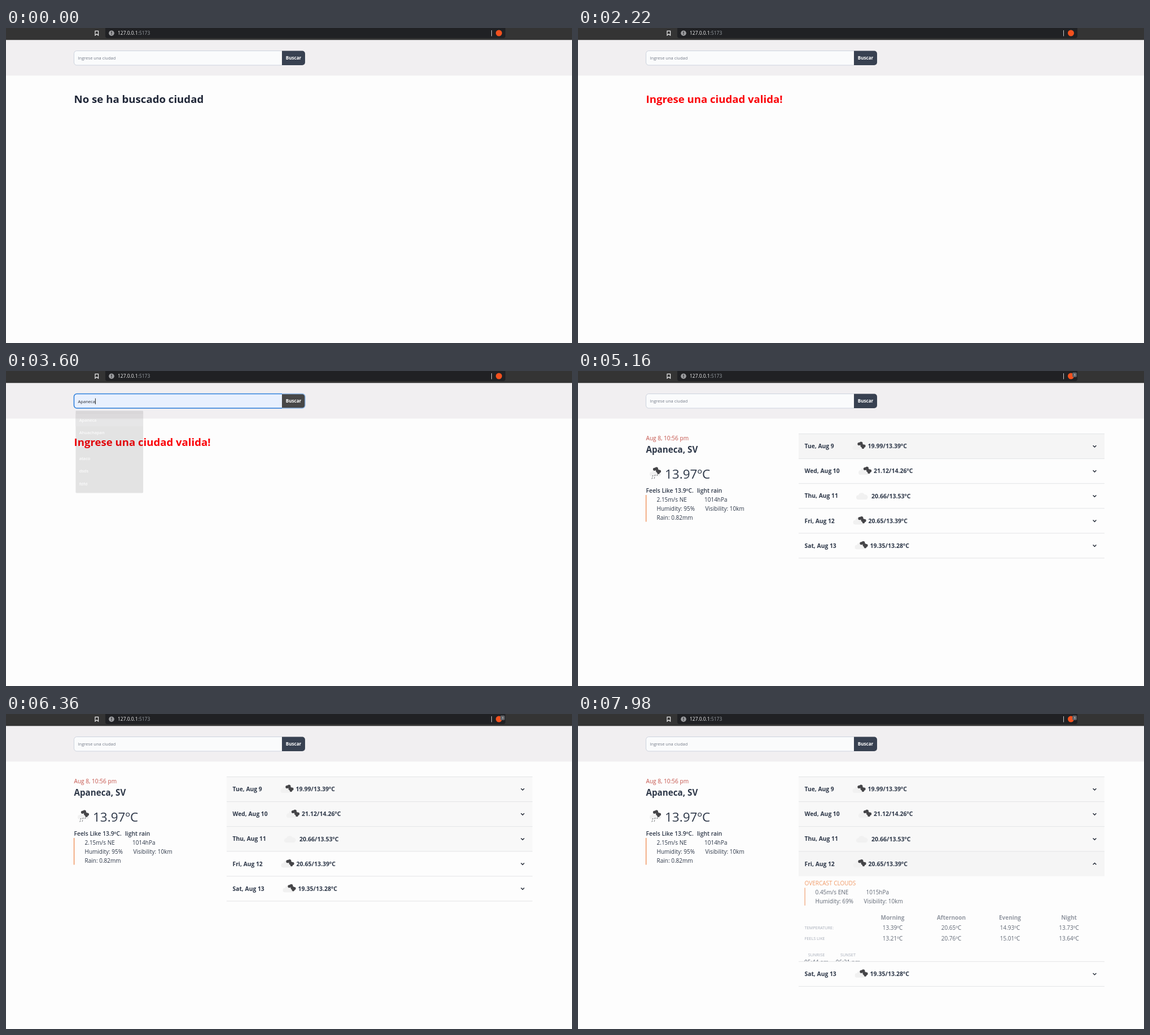
An HTML page that plays this animation: 1003 by 559 pixels, repeating every 8 s.

```html
<!DOCTYPE html>
<html lang="es">
<head>
<meta charset="utf-8">
<title>Clima</title>
<style>
  html, body { margin: 0; width: 100%; height: 100%; overflow: hidden; background: #fdfdfd; }
  svg { display: block; }
  text { font-family: "Open Sans", "Noto Sans", sans-serif; white-space: pre; }
</style>
</head>
<body>
<svg id="stage" width="1003" height="559" viewBox="0 0 1003 559"></svg>
<script>
const stage = document.getElementById('stage');
const LOOP = 8000, STEP = 60;
const INK = '#2d3748', ORANGE = '#ed8243';
const PANEL = 171, ROW = 44.1, TOP = 111.5;
const pen = document.createElement('canvas').getContext('2d');

const clamp = v => Math.max(0, Math.min(1, v));

// CSS "ease": cubic-bezier(.25, .1, .25, 1)
function ease(x) {
  x = clamp(x);
  const bez = (u, a, b) => 3 * u * (1 - u) * (1 - u) * a + 3 * u * u * (1 - u) * b + u * u * u;
  let lo = 0, hi = 1;
  for (let i = 0; i < 24; i++) {
    const mid = (lo + hi) / 2;
    if (bez(mid, .25, .25) < x) lo = mid; else hi = mid;
  }
  return bez(lo, .1, 1);
}

const ramp = (t, a, b) => clamp((t - a + STEP) / (b - a + STEP));
const pulse = (t, a, b, c, d) => ramp(t, a, b) - ramp(t, c, d);

// y is the middle of the capital letters
function text(x, y, size, str, fill = INK, weight = 400, anchor = 'start') {
  return `<text x="${x}" y="${y + size * .357}" font-size="${size}" fill="${fill}" font-weight="${weight}" text-anchor="${anchor}">${str}</text>`;
}
const rect = (x, y, w, h, fill, r = 0) =>
  `<rect x="${x}" y="${y}" width="${w}" height="${h}" rx="${r}" fill="${fill}"/>`;
const circle = (x, y, r, fill) => `<circle cx="${x}" cy="${y}" r="${r}" fill="${fill}"/>`;
const path = (d, stroke, width, extra = '') =>
  `<path d="${d}" fill="none" stroke="${stroke}" stroke-width="${width}" ${extra}/>`;

function lightCloud(x, y) {
  return `<path transform="translate(${x} ${y})" d="M4 12a4 4 0 0 1 0-8a6 6 0 0 1 11-1a4.5 4.5 0 0 1 2 9z" fill="#f1f1f1"/>`;
}
function darkCloud(x, y) {
  return [[-15.5, -4.2, 2.6], [-12, -5, 3], [-10, -1.2, 3], [-6.5, -.5, 2.6], [-8.5, 2.2, 2.4]]
    .map(([dx, dy, r]) => circle(x + dx, y + dy, r, '#454548')).join('');
}

// Browser bar

function browser(t) {
  let s = rect(0, 0, 1003, 21.5, '#343434') + rect(176, -6, 709, 24, '#202124', 4);
  s += path('M158 5.3h5.6v7.6l-2.8-2.2l-2.8 2.2z', '#f0f0f0', 1.2);
  s += circle(187, 9.2, 4.8, '#9c9da0') + rect(186.4, 6.2, 1.2, 3.6, '#202124') + rect(186.4, 10.7, 1.2, 1.3, '#202124');
  s += text(198, 9.3, 8.45, '127.0.0.1<tspan fill="#9aa0a6">:5173</tspan>', '#f2f2f2');
  s += rect(860, 4, 1, 10.5, '#c8c8c8') + circle(873.5, 9, 5.5, '#f4511e');
  if (t >= 4440) s += rect(876, 2.5, 8, 8.5, '#5b5e63', 2) + text(880, 6.8, 6, '3', '#eee', 400, 'middle');
  return s;
}

// Search form

function typed(t) {
  if (t >= 3120 && t < 4200) return 'Apaneca';
  if (t >= 2100) return '';
  return 'fdfd'.slice(0, [780, 840, 1020, 1080].filter(k => t >= k).length);
}

function caretOn(t) {
  return (t >= 480 && t < 1620) || (t >= 2700 && t < 3120) || (t >= 3480 && t < 3960);
}

function form(t) {
  const word = typed(t);
  const ring = pulse(t, 480, 600, 1800, 1920) + pulse(t, 2700, 2820, 4200, 4320);
  const press = pulse(t, 1800, 1920, 2100, 2220) + pulse(t, 4200, 4320, 4440, 4560);
  const fill = word === 'Apaneca' ? '#e8f0fe' : ring > .5 ? '#fefefe' : '#fafbfc';
  const box = 'M489 40.5H125.5a5 5 0 0 0-5 5V61a5 5 0 0 0 5 5H489';
  const button = 'M489 40.5H525a5 5 0 0 1 5 5V61a5 5 0 0 1-5 5H489';
  let s = rect(0, 21.5, 1003, 63, '#f1eff1');
  s += `<path d="${box}z" fill="${fill}"/>` + path(box, '#cdd3de', 1);
  s += `<path d="${button}z" fill="${ring > .5 ? '#474747' : '#384151'}"/>`;
  s += path(box, '#2f80dc', 1.6, `opacity="${ring}"`) + path(button, '#8fb8e8', 1.4, `opacity="${ring}"`);
  s += path('M489 39H525a6.500 6.500 0 0 1 6.500 6.500V61a6.500 6.500 0 0 1-6.500 6.500H489z', '#a9c8ee', 2.4, `opacity="${press}"`);
  s += word ? text(127.5, 53.8, 7.6, word, '#24272e') : text(127.5, 53.8, 7.55, 'Ingrese una ciudad', '#757c89');
  s += text(509.500, 53.3, 8.1, 'Buscar', '#fff', 700, 'middle');
  if (caretOn(t)) {
    pen.font = '7.6px "Open Sans", "Noto Sans", sans-serif';
    s += rect(127.5 + pen.measureText(word).width, 48.5, .9, 10.5, '#111');
  }
  return s;
}

function suggestions(t) {
  const first = t < 2100;
  const a = first ? pulse(t, 480, 600, 1140, 1260) : pulse(t, 2700, 2820, 3480, 3660);
  if (a <= 0) return '';
  const items = first && t >= 780 ? ['fdfd'] : ['Apaneca', 'Ahuachapan', 'atac', 'ataco', 'dsds', 'fdfd'];
  const h = 34 + (items.length - 1) * 23.8, cy = 67 + h / 2, k = 1 - .062 * (1 - a);
  let s = rect(120.5, 67, 125.500, h, '#37373a', 1.5);
  if (t >= 3120 && !first) s += rect(120.5, 73, 125.5, 23, '#505054');
  s += items.map((w, i) => text(127, 84.3 + i * 23.8, 7.8, w, '#f4f4f4', 600)).join('');
  return `<g opacity="${a ** 1.5}" transform="translate(183.5 ${cy}) scale(${k}) translate(-183.5 ${-cy})">${s}</g>`;
}

// Weather

const days = [
  { date: 'Tue, Aug 9', x: 513.5, temp: '19.99/13.39', sky: 'LIGHT RAIN', wind: '0.92m/s NE', hpa: 1014, hum: 77,
    temps: [13.39, 19.99, 15.42, 14.31], feels: [13.26, 20.19, 15.36, 14.24] },
  { date: 'Wed, Aug 10', x: 524, temp: '21.12/14.26' },
  { date: 'Thu, Aug 11', x: 520, temp: '20.66/13.53', plain: true, sky: 'SCATTERED CLOUDS', wind: '0.71m/s NE', hpa: 1015, hum: 71,
    temps: [13.53, 20.66, 15.12, 14.05], feels: [13.38, 20.71, 15.08, 13.97] },
  { date: 'Fri, Aug 12', x: 514.5, temp: '20.65/13.39', sky: 'OVERCAST CLOUDS', wind: '0.45m/s ENE', hpa: 1015, hum: 69,
    temps: [13.39, 20.65, 14.93, 13.73], feels: [13.21, 20.76, 15.01, 13.64] },
  { date: 'Sat, Aug 13', x: 517.5, temp: '19.35/13.28' }
];
const toggles = { 0: [5280, 6120], 2: [6720, 7320], 3: [7800, 9999] };

function current() {
  let s = text(120.5, 119.5, 10.1, 'Aug 8, 10:56 pm', '#c4524a');
  s += text(120.5, 140, 15.2, 'Apaneca, SV', INK, 700);
  s += lightCloud(127, 175) + darkCloud(151, 178.500);
  s += [[133, 185], [137, 184], [141, 183.500], [132, 189], [136, 188.500]]
    .map(([x, y]) => path(`M${x} ${y}l-1.200 2.400`, '#55585c', 1)).join('');
  s += text(154, 183, 22.5, '13.97ºC');
  s += text(120.5, 212.7, 10.3, 'Feels Like 13.9ºC.', INK, 600) + text(211, 212.7, 10.3, 'light rain', INK, 600);
  s += rect(120, 220, 1.2, 47.5, ORANGE);
  s += text(139.5, 228.700, 10, '2.15m/s NE') + text(224, 228.700, 10, '1014hPa');
  s += text(139.5, 244.4, 10, 'Humidity: 95%') + text(225.5, 244.4, 10, 'Visibility: 10km');
  return s + text(139.5, 260.2, 10, 'Rain: 0.82mm');
}

function panel(d, y, h, alpha) {
  const cols = [557.5, 661.5, 765.5, 870];
  let s = text(401.5, 13, 10, d.sky, '#ee7a35') + rect(401.5, 20.5, 1.2, 31.5, ORANGE);
  s += text(420.5, 29, 10, d.wind) + text(510.5, 29, 10, d.hpa + 'hPa');
  s += text(420.5, 44.7, 10, `Humidity: ${d.hum}%`) + text(506.5, 44.7, 10, 'Visibility: 10km');
  ['Morning', 'Afternoon', 'Evening', 'Night'].forEach((name, i) => {
    s += text(cols[i], 73.7, 10, name, '#6f7683', 700, 'middle');
    s += text(cols[i], 92, 10, d.temps[i].toFixed(2) + 'ºC', INK, 400, 'middle');
    s += text(cols[i], 110.5, 10, d.feels[i].toFixed(2) + 'ºC', INK, 400, 'middle');
  });
  const pale = '#8b93a3';
  s += text(401.5, 92, 7.3, 'TEMPERATURE:', pale) + text(401.5, 110.5, 7.3, 'FEELS LIKE', pale);
  s += text(422.5, 140, 7.3, 'SUNRISE', pale, 400, 'middle') + text(478.5, 140, 7.3, 'SUNSET', pale, 400, 'middle');
  s += text(422.5, 153, 10, '05:44 am', INK, 400, 'middle') + text(478.500, 153, 10, '06:21 pm', INK, 400, 'middle');
  return `<svg x="391" y="${y}" width="542" height="${h}" viewBox="391 0 542 ${h}"><g opacity="${alpha}">${s}</g></svg>`;
}

function shade(i, t) {
  const hovered = t < 6180 ? 0 : t < 6780 ? -1 : t < 7800 ? 2 : 3;
  if (i === hovered) return '#f5f5f5';
  return t >= 6180 && i < 3 ? '#f8f8f8' : '#fdfdfd';
}

function forecast(t) {
  let s = '', y = TOP;
  days.forEach((d, i) => {
    const mid = y + 22.1;
    s += rect(391, y, 542, ROW, shade(i, t)) + rect(391, y - .5, 542, 1, '#e3e4e6');
    s += text(401.5, mid, 10.3, d.date, INK, 700);
    s += lightCloud(d.x - 27, mid - 5.5) + (d.plain ? '' : darkCloud(d.x, mid));
    s += text(d.x, mid, 10.55, d.temp + 'ºC', INK, 700);
    let turn = 0, h = 0, alpha = 0;
    if (toggles[i]) {
      const [open, close] = toggles[i];
      const closing = t >= close;
      const go = (inMs, outMs) => closing ? 1 - ease((t - close) / outMs) : ease((t - open) / inMs);
      h = PANEL * go(300, 200);
      alpha = go(400, 300);
      turn = -180 * go(200, 200);
    }
    s += path('M-2.900 -1.400L0 1.500L2.900 -1.400', '#1f2633', 1.4, `transform="translate(915.5 ${mid}) rotate(${turn})"`);
    y += ROW;
    if (h > .1) s += panel(d, y, h, alpha);
    y += h;
  });
  return s + rect(391, y - .5, 542, 1, '#e3e4e6');
}

function content(t) {
  if (t >= 4440) return current() + forecast(t);
  return t < 1800
    ? text(120.5, 126.700, 18.65, 'No se ha buscado ciudad', '#1f2637', 700)
    : text(120.5, 126.700, 18.6, 'Ingrese una ciudad valida!', '#fb0007', 700);
}

let shown = -1;
function draw(now) {
  const t = Math.floor((now % LOOP) / STEP) * STEP;
  if (t !== shown) {
    shown = t;
    stage.innerHTML = rect(0, 0, 1003, 559, '#fdfdfd') + browser(t) + form(t) + content(t) + suggestions(t);
  }
  requestAnimationFrame(draw);
}
const start = performance.now();
draw(0);
requestAnimationFrame(function tick() {
  draw = now => {
    const t = Math.floor((Math.max(0, now - start) % LOOP) / STEP) * STEP;
    if (t !== shown) {
      shown = t;
      stage.innerHTML = rect(0, 0, 1003, 559, '#fdfdfd') + browser(t) + form(t) + content(t) + suggestions(t);
    }
    requestAnimationFrame(draw);
  };
});
</script>
</body>
</html>
```
